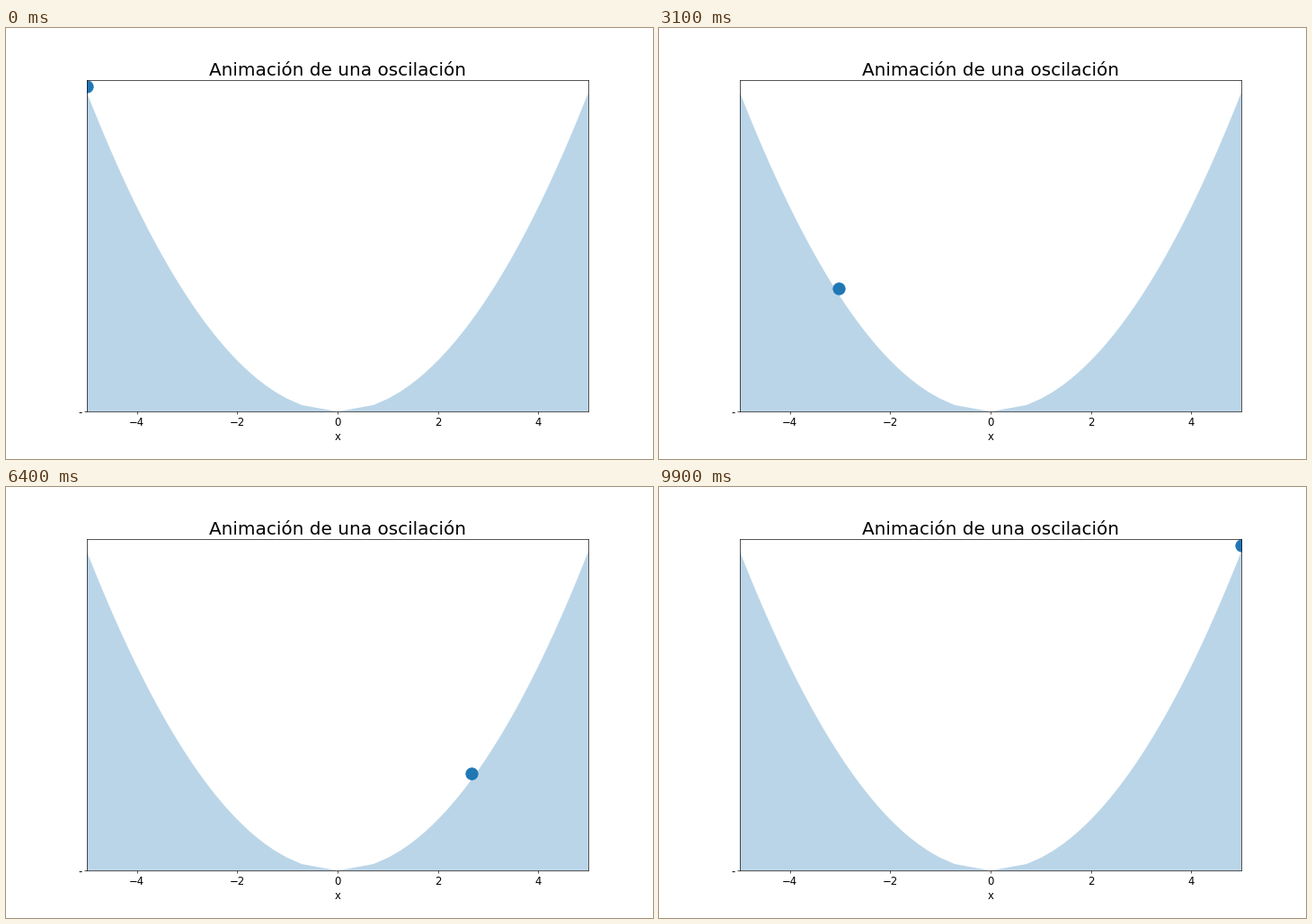
Recreate the animation shown at these times as a matplotlib script. Size 720 by 480 pixels, loop 10 s.

```python
import numpy as np
import matplotlib.pyplot as plt
from matplotlib.animation import FuncAnimation

plt.rcParams["font.family"] = "DejaVu Sans"
plt.rcParams["font.size"] = 14

FRAMES = 100
INTERVAL = 100
X_MAX = 5
LIFT = 0.5  # keeps the ball resting on top of the well

# Height falls and rises at a constant rate, so x follows a square root.
heights = np.linspace(X_MAX**2, 0, FRAMES // 2)
left = -np.sqrt(heights)
x = np.concatenate([left, -left[::-1]])
y = x**2

fig, ax = plt.subplots(figsize=(12, 8), dpi=60)
fig.subplots_adjust(left=0.125, right=0.9, bottom=0.11, top=0.88)
ax.set_xlim(-X_MAX, X_MAX)
ax.set_ylim(0, X_MAX**2 + 1)
ax.set_title("Animación de una oscilación", fontsize=24)
ax.set_xlabel("x")
ax.set_xticks(range(-4, 5, 2))
ax.set_yticks([0], ["-"])

ax.fill_between(x, y, color=None, facecolor="C0", alpha=0.3)
ball, = ax.plot([], [], "o", color="C0", markersize=16)


def update(i):
    ball.set_data([x[i]], [y[i] + LIFT])
    return ball,


anim = FuncAnimation(fig, update, frames=FRAMES, interval=INTERVAL,
                     repeat=True, repeat_delay=0)
plt.show()
```
